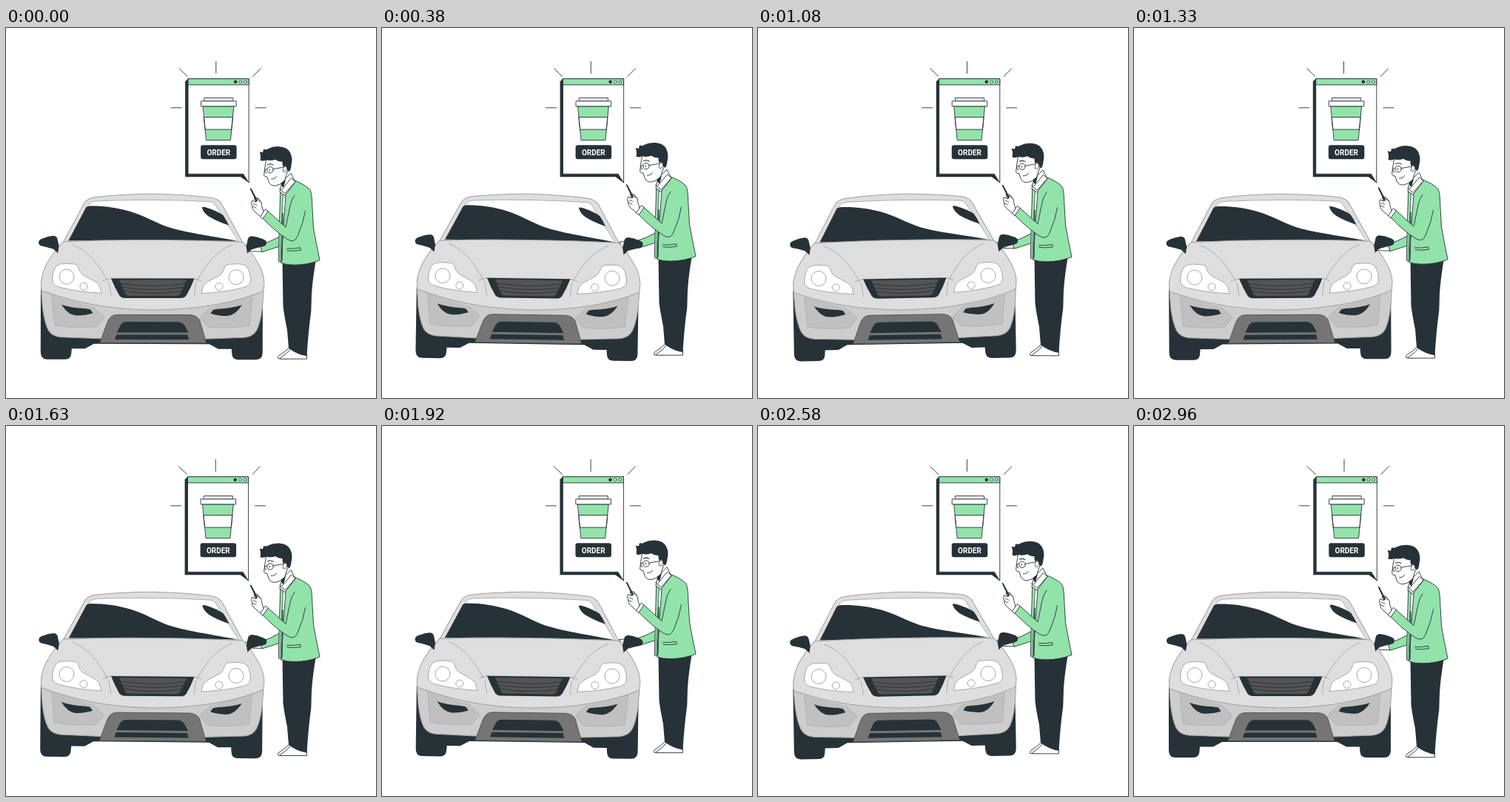
Recreate the animation shown at these times as an HTML page with a canvas. Size 500 by 500 pixels, loop 3 s.

```html
<!DOCTYPE html>
<html lang="en">
<head>
<meta charset="utf-8">
<title>Order to the car</title>
<style>
  html, body { margin: 0; width: 100%; height: 100%; overflow: hidden; background: #fff; }
  canvas { display: block; width: 500px; height: 500px; }
</style>
</head>
<body>
<canvas id="stage"></canvas>
<script>
const SIZE = 500, LOOP = 1500, LEAD = 45;
const DARK = '#263238', GREEN = '#92e3a9', WHITE = '#fff';
const BODY = '#dedede', LOWER = '#cdcdcd', PANEL = '#c0c0c0', EDGE = '#a0a0a0', BUMPER = '#757575';

const canvas = document.getElementById('stage');
const ctx = canvas.getContext('2d');
const ratio = window.devicePixelRatio || 1;
canvas.width = canvas.height = SIZE * ratio;

const cache = new Map();
function toPath(d) {
  if (!cache.has(d)) cache.set(d, new Path2D(d));
  return cache.get(d);
}

function shape(d, fill, stroke, width = 0.9) {
  const p = toPath(d);
  if (fill) { ctx.fillStyle = fill; ctx.fill(p); }
  if (stroke) { ctx.strokeStyle = stroke; ctx.lineWidth = width; ctx.stroke(p); }
}

const line = (d, color = DARK, width = 0.9) => shape(d, null, color, width);

function disc(x, y, r, fill, stroke, width = 0.9) {
  ctx.beginPath();
  ctx.arc(x, y, r, 0, Math.PI * 2);
  if (fill) { ctx.fillStyle = fill; ctx.fill(); }
  if (stroke) { ctx.strokeStyle = stroke; ctx.lineWidth = width; ctx.stroke(); }
}

function group(draw) {
  ctx.save();
  draw();
  ctx.restore();
}

// Draws a part, then its reflection: x becomes sum - x.
function both(sum, draw) {
  draw();
  group(() => { ctx.transform(-1, 0, 0, 1, sum, 0); draw(); });
}

const families = ['"Noto Sans"', '"Open Sans"', 'Roboto', 'Lato'];

// Sets the text in the narrowest family, as large as the width allows.
function label(text, x, y, maxWidth) {
  const widthOf = (family, size) => {
    ctx.font = `600 extra-condensed ${size}px ${family}, sans-serif`;
    return ctx.measureText(text).width;
  };
  const family = families.reduce((a, b) => widthOf(b, 12) < widthOf(a, 12) ? b : a);
  let size = 12.75;
  while (size > 9 && widthOf(family, size) > maxWidth) size -= 0.25;
  ctx.fillStyle = WHITE;
  ctx.textAlign = 'center';
  ctx.textBaseline = 'alphabetic';
  ctx.fillText(text, x, y);
}

function bubble() {
  line('M283.7 45V61M234 54.5L245 65M344 54.5L333.5 65M223 107.5H237M337 107.5H351');

  shape('M246 68L242 72V201H317L328 209V197H246Z', DARK);
  shape('M246.3 68.3H328V209L320.5 197H246.3Z', WHITE, DARK);
  shape('M246.3 68.3H328V76.5H246.3Z', GREEN, DARK);
  disc(310, 72.4, 1.9, DARK, DARK, 0.8);
  disc(316.8, 72.4, 1.8, WHITE, DARK, 0.8);
  disc(323.4, 72.4, 1.8, WHITE, DARK, 0.8);

  shape('M266.3 105.5H307.7L303.3 151.3H270.8Z', GREEN);
  shape('M267.7 120.2H306.3L304.7 136.8H269.3Z', WHITE, DARK);
  line('M266.3 105.5H307.7L303.3 151.3H270.8Z');
  shape('M268 94.2H306.8V98.5H268Z', WHITE, DARK);
  shape('M263.8 98.5H311V105.5H263.8Z', WHITE, DARK);

  shape('M266 158H308.5Q311.5 158 311.5 161V174Q311.5 177 308.5 177H266Q263 177 263 174V161Q263 158 266 158Z', DARK);
  label('ORDER', 287.2, 172, 32);
}

function farArm() {
  shape('M345 293L336 295L328 293.5L320 294L323 297L320 299.5L328 301.5L346 302Z', WHITE, DARK);
  shape('M370 281.5L356 288.5L343 293L346 302.5L371 294.5Z', GREEN, DARK);
}

function legs() {
  shape('M383 431.5Q376 438.5 369 442.5Q366.5 445 368 446.7H381L393 440Z', WHITE, DARK);
  shape('M385 433Q380 440 373 444Q370 445.5 370.5 447H406.5V441L402 435Z', WHITE, DARK);
  shape('M373.5 315L418.5 315Q414 342 413 360L412.3 383Q408.5 410 406.5 443Q394 441.5 382 432.5L380 408Q375.5 386 374.5 376Z', DARK);
}

function head() {
  shape('M370 221L373 208L385 196L391 208L377 226Z', WHITE, DARK);
  shape('M352 176L349.8 188L348.6 198.5Q349.5 201.5 353 201L355 207.5Q357 213 364 213Q371 212 376.5 206L381 192L377 176L362 171Z', WHITE, DARK);
  shape('M371.5 209.5L378 204.5L375 215.5Q371.5 213 371.5 209.5Z', DARK);
  shape('M343.5 178.5Q345 173 342.6 167Q346 168.5 347.5 167Q347 164 349 163.5Q352 165 354 163Q361 159.5 369 160Q380 160.5 384 168Q388 176 385.5 185Q385 191.5 382.5 194L379 190L377.5 186L375 188Q373 184.5 373.5 180.5Q368 180.5 364 177.5Q358 180 352 178Q347.5 180.5 343.5 178.5Z', DARK);
  shape('M374.8 189Q376 185.5 379 187.5Q380.8 190.5 378 194Q376 195.5 374.5 194Z', WHITE, DARK, 0.7);
  disc(357, 191.5, 4.2, null, DARK);
  line('M352.8 190.5Q350 189.5 350 193Q350 196 352 196M361.2 190.4L375 188');
  line('M353.5 184.5Q357 182.5 361 184.8', DARK, 1.1);
  disc(356.3, 191.5, 0.9, DARK);
  line('M358.5 204Q364 204 365.5 200.5');
}

function torso() {
  shape('M371 221L368.5 314L376 318L381 222Z', WHITE, DARK);
  shape('M370 217L373.5 225L377 222L375 218Z', WHITE, DARK);
  shape('M378.5 221L390.5 206Q404 211.5 410.5 218Q413.5 222 413.8 240L415.5 270Q419 290 424 313.5Q408 320 390 320Q379 320 372 317.5L374.5 275Z', GREEN, DARK);
  shape('M371 221Q373 222.5 374.5 224L372.5 260L371 316.5L368.5 315.5L369.5 260Z', GREEN, DARK, 0.7);
  line('M374 250L372.8 314', DARK, 1.4);
  line('M379.5 297.8Q389 298.6 397.5 296.6L398.5 300Q389 302 380 300.6');
}

function nearArm() {
  shape('M348 248L345.5 239.5Q346 234 342 233L338 228.5L335 230L338 235L332.5 233Q330.5 236 332.5 240Q332 244.5 336.5 248.5L344.5 255Z', WHITE, DARK);
  shape('M329.5 216.5Q330.8 215.6 332 217.4L340 232.8Q340 235 337.8 234Z', DARK);
  line('M334 237L339 239.5M333.5 241L338 243M340 229L344.5 235', DARK, 0.8);
  shape('M346.5 256.5Q347.5 250 353 246.5L378 269L383.5 240L404.5 246Q402 262 394 281Q390 290.5 381.5 286Q364 275 346.5 256.5Z', GREEN);
  line('M404.5 247Q402 263 394 281Q390 290.5 381.5 286Q364 275 346.5 256.5Q347.5 250 353 246.5L378 269L384 240Q386 231 390 226');
  shape('M343.8 254.5L350.5 244.5L354 247.5L347 257.5Z', WHITE, DARK);
}

function man() {
  farArm();
  legs();
  torso();
  head();
  shape('M372 219L385.5 202.5L391 207.5L377.5 223Z', WHITE, DARK);
  nearArm();
}

function wheels() {
  both(394, () => {
    shape('M47 352V438Q47 448 56 448H80Q88 448 88.5 440L89 433.5H107L119 427H197V400H100Z', DARK);
  });
}

function cabin() {
  shape('M77 290L105 238Q108.5 231 119 229Q158 224.5 198 224.3Q240 225 277 229Q287 230.5 291.5 238L320 290Z', BODY, EDGE, 1);
  shape('M84 288L113 237Q116 234.5 122 234Q198 230.5 276 234.5Q280 235 282 238L314 288Z', WHITE, EDGE, 0.8);
  shape('M84.5 287.5L108 242.5Q110 240.8 114 240.6C135 240.5 150 243 168 248C188 254 201 263 219 269C241 276 271 280 313 287.5Z', DARK);
  shape('M264.5 242Q266 240.8 271 242.5Q284 246.5 293 252.5Q297 258 301 266.5Q284 260.5 274 254.5Q266 249 264.5 242Z', DARK);
}

function shell() {
  shape('M48 340Q47.5 360 49.5 378Q52 398 57 408Q62 417 74 418L128 420H268L322 418Q334 417 339 408Q344 398 346.5 378Q348.5 360 348 340Z', LOWER, EDGE, 1);
  both(395, () => {
    shape('M49 356L62 361L66 402Q90 406 122 404L133 391L118 377Q92 370 49 356Z', PANEL);
    line('M62 361L66 402Q90 406 122 404L133 391L118 377', '#adadad', 0.8);
  });
  shape('M77 289Q138 286 198 286.5Q260 286 320 289Q334 305 342 320Q348.5 332 349 344L348 355C318 368 268 381 197 381C130 380 88 369 48 355L47.5 344Q48.5 333 54 321Q63 304 77 289Z', BODY, EDGE, 1);
  both(395, () => {
    line('M90 293Q105 299 116 311Q128 324 137 342', EDGE, 0.8);
  });
  line('M131 342Q136 338.5 144 338.5H252Q260 338.5 264 342', EDGE, 0.8);
  line('M256.5 344L254.5 362M139 344L142 362', EDGE, 0.8);
}

function headlights() {
  both(393, () => {
    shape('M62.5 341Q63 328 68 322Q72 318.5 80 318.5L92 319Q96 319.5 97.5 323Q99.5 331 105 334.5L120 342.5Q126 346 126.8 350L129 358.5Q98 357 72 350.5Q62.5 348 62.5 341Z', WHITE, EDGE);
    disc(82, 336.5, 10, WHITE, EDGE);
    disc(105, 349.3, 5, WHITE, EDGE);
  });
}

function grille() {
  shape('M142 338.5H254.5Q250 351 244 361Q241.5 365 236 365H161Q155.5 365 153 361Q147 351 142 338.5Z', DARK);
  shape('M153 340.5H244L236 358.5Q234.5 362 230 362H167Q162.5 362 161 358.5Z', '#545454');
  for (let i = 0; i < 3; i++) {
    const y = 345.5 + i * 5, inset = i * 2.5;
    line(`M${155 + inset} ${y}Q198 ${y + 6} ${242 - inset} ${y}`, DARK, 0.9);
  }
}

function bumper() {
  both(394, () => {
    shape('M75 374Q88 378.5 108 379.5L114 380.5L117.5 385.5Q107 389 95 388.8Q84 388.3 75 374Z', DARK);
  });
  shape('M127 425.5L137 398Q141 387.5 150 387.5H247Q258 387.5 262 395L271 425.5Z', BUMPER, '#4c4c4c', 0.8);
  shape('M150 411.5L154.5 402Q157 397.2 163 397.2H232Q238.5 397.2 241.5 402L246.5 411.5Z', DARK);
  shape('M149.5 414.5H245.5L247.5 421H147Z', DARK);
}

function wingMirrors() {
  both(396, () => {
    shape('M44 290.5Q43.5 286.5 50 284.5Q57 281.5 64 281Q69 281.5 69.5 286L71.5 295L70 304.5L64 299Q56 296.5 49 295Q44.5 294.5 44 290.5Z', DARK);
  });
}

function car() {
  wheels();
  cabin();
  shell();
  headlights();
  grille();
  bumper();
  wingMirrors();
}

// Rocks 0, +1, 0, -1, 0 in straight segments.
function sway(p) {
  if (p < 0.25) return p * 4;
  if (p < 0.75) return 2 - p * 4;
  return p * 4 - 4;
}

function render(ms) {
  const p = ((ms + LEAD) % LOOP) / LOOP;
  const lift = 1 - Math.abs(1 - 2 * p);

  ctx.setTransform(ratio, 0, 0, ratio, 0, 0);
  ctx.fillStyle = WHITE;
  ctx.fillRect(0, 0, SIZE, SIZE);
  ctx.lineJoin = ctx.lineCap = 'round';

  group(() => { ctx.translate(0.3 - 3 * lift, 0.3); bubble(); });
  group(() => { ctx.translate(0, 0.8 - 10 * lift); man(); });
  group(() => {
    ctx.translate(198, 336);
    ctx.rotate(sway(p) * Math.PI / 180);
    ctx.translate(-198, -336);
    car();
  });
}

const start = performance.now();
function tick() {
  render(performance.now() - start);
  requestAnimationFrame(tick);
}
tick();
</script>
</body>
</html>
```
